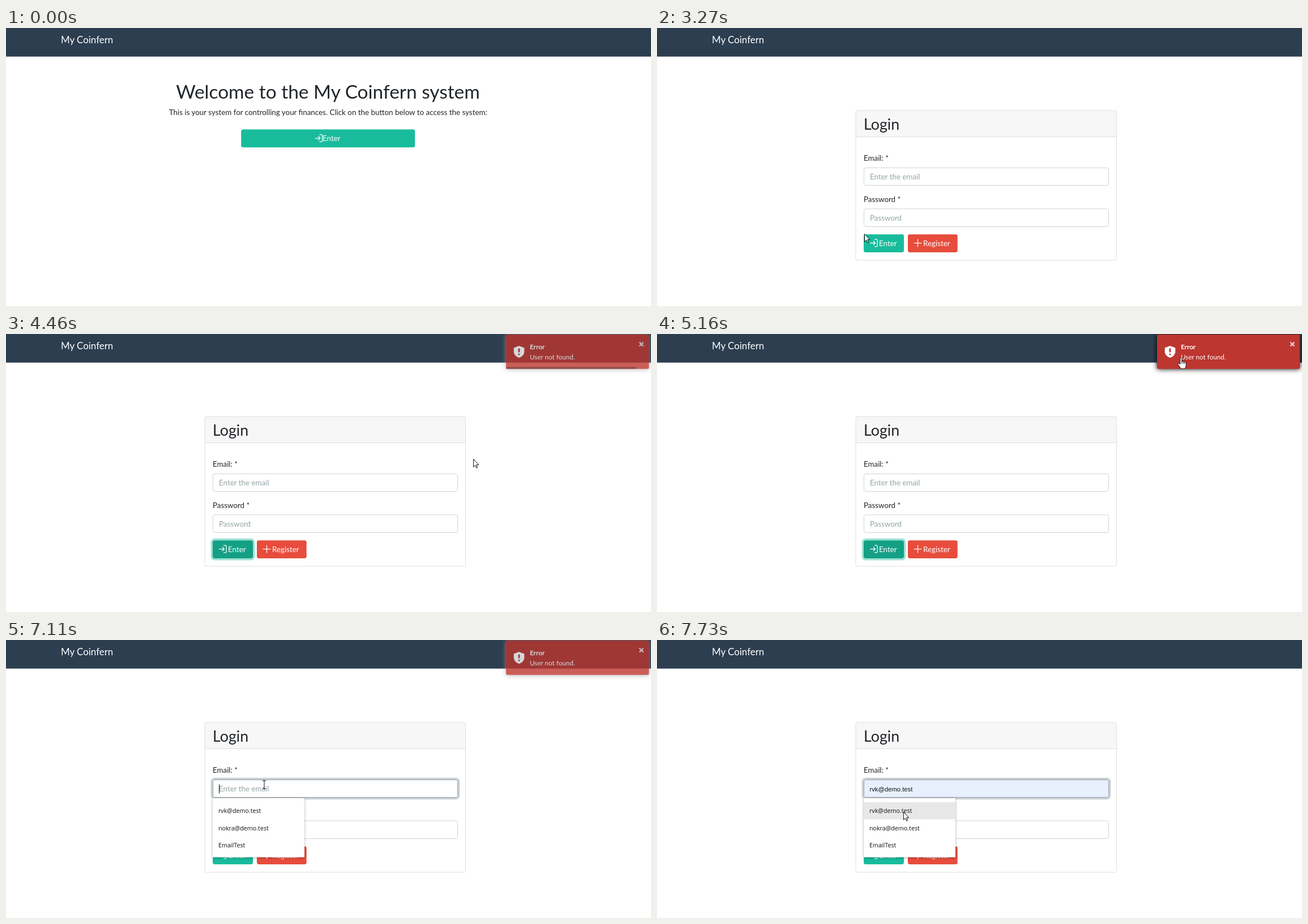
An HTML page for the animation above (7.99 s loop, 1139 by 492 pixels).

```html
<!DOCTYPE html>
<html lang="en">
<head>
<meta charset="utf-8">
<title>My Coinfern</title>
<style>
  html, body { margin: 0; width: 100%; height: 100%; overflow: hidden; background: #fff; }
  svg { display: block; }
  text { font: 13.37px Lato, sans-serif; fill: #212529; }
  .white text, .white { fill: #fff; }
  .brand { font-size: 16.9px; }
  .h1 { font-size: 33.43px; }
  .h2 { font-size: 26.8px; }
  .hint { fill: #95a5a6; }
  .line { fill: none; stroke: #fff; stroke-width: 1.25; stroke-linecap: round; stroke-linejoin: round; }
  .field { fill: #fff; stroke: #ced4da; }
  .ring { fill: none; stroke-width: 3.4; }
  #toast text { font-size: 11.7px; }
  #toast .title { font-weight: bold; }
  #list text { font: 10.7px "Open Sans", sans-serif; fill: #111; }
  #list .panel { fill: #fff; filter: drop-shadow(0 1px 2px #0005); }
  #filled text { font: 11.25px "Liberation Sans", Arial, sans-serif; fill: #111; }
  #cursor path { fill: #fff; stroke: #111; stroke-width: 1; stroke-linejoin: round; }
</style>
</head>
<body>
<svg width="1139" height="492" viewBox="0 0 1139 492">
  <defs>
    <path id="signIn" class="line" d="M8.7 .7H12a1.3 1.3 0 0 1 1.3 1.3V12a1.3 1.3 0 0 1-1.3 1.3H8.7M.7 7H9.6M6.4 3.8L9.6 7L6.4 10.2"/>
  </defs>
  <rect width="1139" height="50.6" fill="#2c3e50"/>
  <text class="brand white" x="97" y="27">My Coinfern</text>

  <g id="home">
    <text class="h1" x="568.5" y="124.6" text-anchor="middle">Welcome to the My Coinfern system</text>
    <text x="568.8" y="154" text-anchor="middle">This is your system for controlling your finances. Click on the button below to access the system:</text>
    <g class="white">
      <rect id="homeBtn" x="415.2" y="179.4" width="307" height="31.8" rx="3.4"/>
      <use href="#signIn" x="545.2" y="188"/>
      <text x="559" y="200.3">Enter</text>
    </g>
  </g>

  <g id="login">
    <rect x="351" y="146" width="460.5" height="265" rx="3" fill="#fff"/>
    <path d="M351 192.5V149a3 3 0 0 1 3-3H808.5a3 3 0 0 1 3 3V192.5z" fill="#f7f7f7"/>
    <path d="M351 192.5H811.5" stroke="#dfdfdf"/>
    <rect x="351" y="146" width="460.5" height="265" rx="3" fill="none" stroke="#dfdfdf"/>
    <text class="h2" x="365" y="179.5">Login</text>
    <text x="365" y="235.2">Email: *</text>
    <rect id="email" class="field" x="365.5" y="247.5" width="432" height="31" rx="3.2"/>
    <rect id="emailRing" class="ring" x="363.4" y="245.4" width="436.2" height="35.2" rx="5" stroke="#cacfd3"/>
    <text id="emailHint" class="hint" x="376" y="268.2">Enter the email</text>
    <g id="filled"><text x="375.5" y="268.2">rvk@demo.test</text></g>
    <path id="caret" d="M376.5 255.5V271.5" stroke="#111"/>
    <text x="365" y="308">Password *</text>
    <rect class="field" x="365.5" y="320" width="432" height="31.5" rx="3.2"/>
    <text class="hint" x="376" y="341">Password</text>
    <g class="white">
      <rect id="enterRing" class="ring" x="363.4" y="363.4" width="74.2" height="35.4" rx="5" stroke="#9de2d5"/>
      <rect id="enterBtn" x="365" y="365.2" width="71" height="31.8" rx="3.4"/>
      <use href="#signIn" x="375.8" y="373.5"/>
      <text x="392" y="386.3">Enter</text>
      <rect x="443" y="365.2" width="87.7" height="31.8" rx="3.4" fill="#e74c3c"/>
      <path class="line" d="M454 380.5H467M460.5 374V387"/>
      <text x="470" y="386.3">Register</text>
    </g>
    <g id="list">
      <rect class="panel" x="365" y="280" width="162" height="104.5"/>
      <rect id="picked" x="365" y="287" width="162" height="30.3" fill="#e8e8e8"/>
      <text x="375" y="306">rvk@demo.test</text>
      <text x="375" y="336.5">nokra@demo.test</text>
      <text x="375" y="367">EmailTest</text>
    </g>
  </g>

  <g id="toast" class="white">
    <rect id="toastBox" x="883" y="1" width="252.3" height="60.8" rx="2.5" fill="#bd362f"/>
    <path d="M906 21L915.3 24.4V30.5C915.3 36.5 911.5 40 906 42C900.5 40 896.7 36.5 896.7 30.5V24.4z"/>
    <path d="M906 25.5V32.3M906 34.7V37.2" stroke="#bd362f" stroke-width="2.8"/>
    <text class="title" x="925" y="27">Error</text>
    <text x="925" y="45">User not found.</text>
    <path d="M1118.5 14.5L1125.5 21.5M1125.5 14.5L1118.5 21.5" stroke="#fff" stroke-width="2.2" opacity=".8"/>
    <rect id="bar" x="883" y="58.4" height="3.4" fill="#000" opacity=".4"/>
  </g>

  <g id="cursor">
    <path id="arrow" d="M.5 .5V14.3L3.6 11.4L5.7 16.2L7.7 15.3L5.6 10.6H9.8z"/>
    <path id="hand" d="M-1.6 11V.9a1.5 1.5 0 0 1 3 0V6.5a1.4 1.4 0 0 1 2.6.3a1.4 1.4 0 0 1 2.5.6a1.3 1.3 0 0 1 2.3.8V13c0 2-1.4 3-1.6 6H-.6c-.4-2-2-3.5-3-5.2c-.9-1.6-2.2-2.6-2-3.6c.4-1.4 2-1.2 2.8-.2zM1.4 6.5V10M4 6.8V10M6.5 7.4V10.4"/>
    <path id="beam" d="M-3-7H3M0-7V7M-3 7H3"/>
  </g>
</svg>
<script>
const LOOP = 7990;
const $ = id => document.getElementById(id);
const show = (id, on) => $(id).style.display = on ? '' : 'none';
const clamp = v => Math.max(0, Math.min(1, v));

// pointer path: time, x, y
const path = [
  [0, 1150, 500], [124, 1150, 500], [190, 1106, 475], [324, 1106, 475], [460, 932, 366],
  [924, 932, 366], [1190, 659, 254], [1394, 659, 254], [1600, 598, 202], [2200, 598, 202],
  [2330, 597, 201], [2864, 597, 201], [3070, 365.5, 363.5], [3204, 365.5, 363.5],
  [3270, 366, 364], [3410, 392, 386], [4060, 392, 386], [4460, 825, 221], [5000, 900, 58],
  [5300, 951, 27], [5720, 949, 7], [5914, 949, 7], [6050, 795.5, 89.5], [6450, 435, 303],
  [6750, 450, 262], [6890, 456, 256], [7200, 456, 256], [7594, 434, 293], [7730, 435, 304]
];

// the pointer is sampled about 15 times a second
function pointer(t) {
  const i = path.findIndex(k => k[0] > t);
  if (i < 0) return path.at(-1).slice(1);
  const [a, ax, ay] = path[i - 1], [b, bx, by] = path[i];
  const n = Math.max(1, Math.round((b - a) / 67));
  const u = Math.floor(n * (t - a) / (b - a) + 0.05) / n;
  return [ax + (bx - ax) * u, ay + (by - ay) * u];
}

function draw(t) {
  const [x, y] = pointer(t);
  const over = (l, top, r, b) => x >= l && x <= r && y >= top && y <= b;
  const login = t >= 2200;
  const enterFocus = t >= 3690 && t < 6890;
  const emailFocus = t >= 6890;
  const picked = t >= 7500;
  const toast = t >= 3960 && t < 7410;
  const onHome = !login && over(415, 179, 722, 211);
  const onEnter = login && over(365, 365, 436, 397);
  const green = dark => dark ? '#14a085' : '#18bc9c';

  show('home', !login);
  show('login', login);
  $('homeBtn').setAttribute('fill', green(onHome));
  $('enterBtn').setAttribute('fill', green(onEnter || enterFocus));
  show('enterRing', enterFocus);

  show('emailRing', emailFocus);
  $('email').style.stroke = emailFocus ? '#969fa8' : '';
  $('email').style.fill = picked ? '#e8f0fe' : '';
  show('emailHint', !picked);
  show('filled', picked);
  show('picked', picked);
  show('caret', emailFocus && t < 7390);
  show('list', t >= 6960);

  const hover = t >= 5000 && t < 6110;
  const left = t < 5000 ? 1 - (t - 4025) / 5000 : hover ? 0 : 1 - (t - 6110) / 1000;
  show('toast', toast);
  $('toast').style.opacity = hover ? 1 : 0.8 * clamp((t - 3960) / 300) * clamp((7410 - t) / 300);
  $('toastBox').style.filter = `drop-shadow(0 0 5px ${hover ? '#000' : '#999'})`;
  $('bar').setAttribute('width', 252.3 * clamp(left));

  const onToast = toast && over(883, 1, 1135, 62);
  const kind = onHome || onEnter || onToast ? 'hand'
    : login && over(365, 247, 798, 279) ? 'beam' : 'arrow';
  for (const id of ['arrow', 'hand', 'beam']) show(id, id === kind);
  $('cursor').setAttribute('transform', `translate(${x} ${y})`);
}

function frame() {
  draw(performance.now() % LOOP);
  requestAnimationFrame(frame);
}
frame();
</script>
</body>
</html>
```
